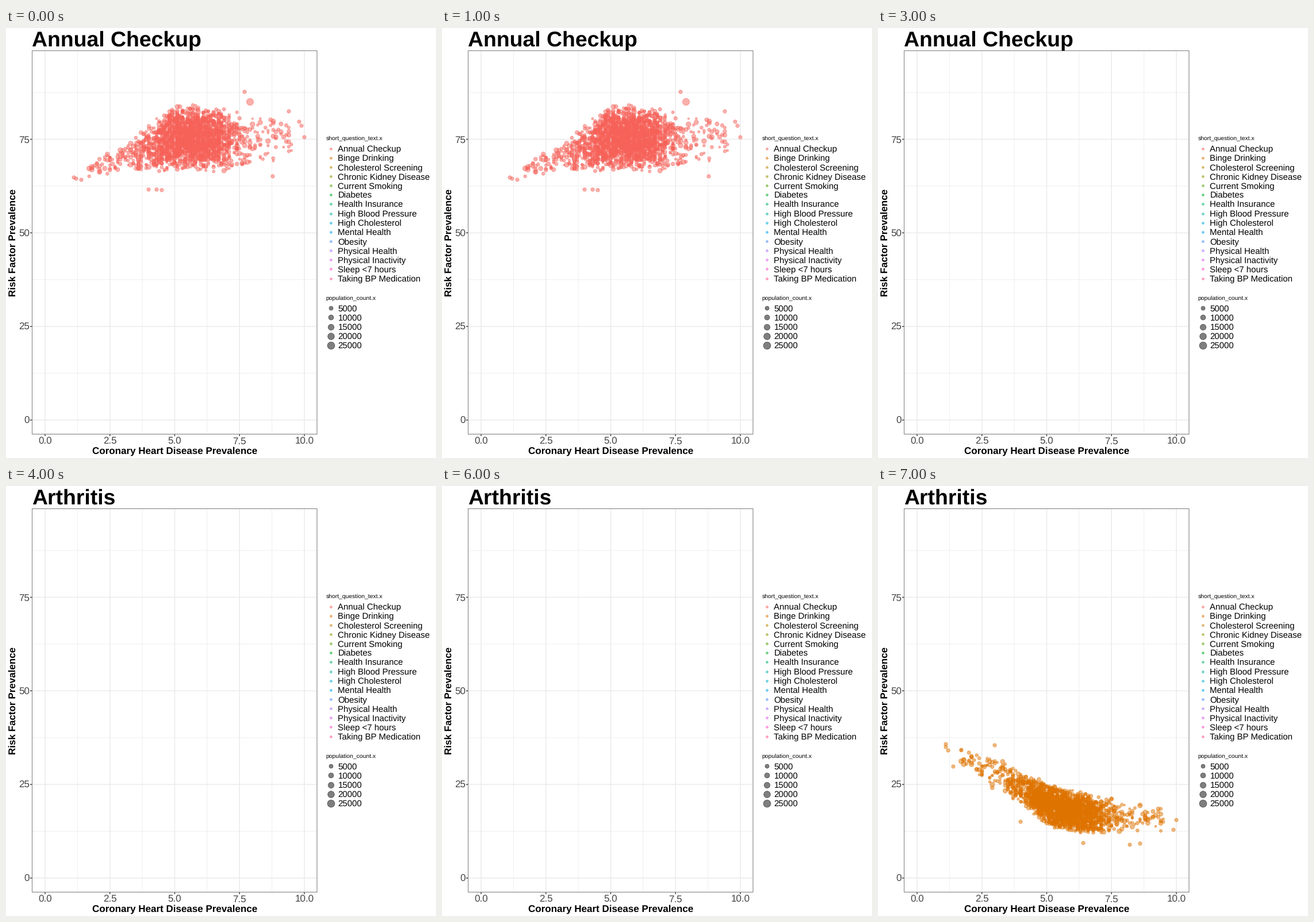
A matplotlib script that plays this animation: 748x748 px, repeating every 8000 ms.

```python
import numpy as np
import matplotlib.pyplot as plt
from matplotlib.animation import FuncAnimation
from matplotlib.colors import to_rgb

SIZE, DPI = 748, 64
PX = 72 / DPI  # points per pixel
LEFT, RIGHT, TOP, BOTTOM = 45.5, 541, 39.5, 706.5

plt.rcParams["font.family"] = "Liberation Sans"
plt.rcParams["text.hinting"] = "none"

fig = plt.figure(figsize=(SIZE / DPI, SIZE / DPI), dpi=DPI, facecolor="white")
ax = fig.add_axes([0, 0, 1, 1])
ax.set_xlim(0, SIZE)
ax.set_ylim(SIZE, 0)
ax.axis("off")


def px_x(v):
    return 68 + 45.1 * v


def px_y(v):
    return 682 - 6.513 * v


def line(xs, ys, color, width, z=1):
    ax.plot(xs, ys, color=color, lw=width * PX, zorder=z,
            solid_capstyle="butt", snap=False)


def label(x, y, text, size, color="black", **kw):
    return ax.text(x, y, text, fontsize=size * PX, color=color,
                   va="baseline", zorder=5, **kw)


def dots(x, y, diameter, color):
    edge = 0.9
    side = (np.asarray(diameter) - edge) * PX
    return ax.scatter(x, y, s=side ** 2, color=color, alpha=0.5,
                      lw=edge * PX, zorder=3)


def deepen(color):
    return tuple(np.array(to_rgb(color)) ** 1.25)


def draw_panel():
    for shift, width in ((0.5, 0.8), (0, 1.5)):
        for k in range(4 if shift else 5):
            x = px_x(2.5 * (k + shift))
            line([x, x], [TOP, BOTTOM], "#ebebeb", width)
        for k in range(4):
            y = px_y(25 * (k + shift))
            line([LEFT, RIGHT], [y, y], "#ebebeb", width)
    line([LEFT, RIGHT, RIGHT, LEFT, LEFT], [TOP, TOP, BOTTOM, BOTTOM, TOP],
         "#858585", 1.1, 4)
    for k in range(5):
        x = px_x(2.5 * k)
        line([x, x], [BOTTOM, BOTTOM + 3.5], "#333333", 1.4)
        label(x, 723.5, f"{2.5 * k:.1f}", 17, "#444444", ha="center")
    for k in range(4):
        y = px_y(25 * k)
        line([LEFT - 3.5, LEFT], [y, y], "#333333", 1.4)
        label(41, y + 6, str(25 * k), 17, "#444444", ha="right")
    label(293.3, 740.3, "Coronary Heart Disease Prevalence", 17,
          weight="bold", ha="center")
    label(17, 373.8, "Risk Factor Prevalence", 17, weight="bold",
          ha="center", rotation=90, rotation_mode="anchor")


def draw_legends():
    factors = {
        "Annual Checkup": "#F8766D", "Binge Drinking": "#E58700",
        "Cholesterol Screening": "#C99800",
        "Chronic Kidney Disease": "#A3A500", "Current Smoking": "#6BB100",
        "Diabetes": "#00BA38", "Health Insurance": "#00BF7D",
        "High Blood Pressure": "#00C0AF", "High Cholesterol": "#00BCD8",
        "Mental Health": "#00B0F6", "Obesity": "#619CFF",
        "Physical Health": "#B983FF", "Physical Inactivity": "#E76BF3",
        "Sleep <7 hours": "#FD61D1", "Taking BP Medication": "#FF67A4",
    }
    label(556.7, 195.2, "short_question_text.x", 10.35)
    for k, (name, color) in enumerate(factors.items()):
        y = 209.7 + 16.15 * k
        dots([564.7], [y - 0.2], [4.6], deepen(color))
        label(577.5, y + 5.4, name, 15)
    label(556.7, 473.2, "population_count.x", 10.35)
    for k in range(5):
        y = 487.3 + 16.1 * k
        dots([564.7], [y], [7.8 + 5.8 * (k / 4) ** 0.8], "black")
        label(577.5, y + 5.4, str(5000 * (k + 1)), 15)


rng = np.random.default_rng(12)
COUNT = 2050
core = rng.random(COUNT) < 0.7
prevalence = np.where(core, rng.normal(5.65, 0.85, COUNT),
                      rng.normal(5.4, 2.1, COUNT))
outside = (prevalence < 1.7) | (prevalence > 9.6)
prevalence[outside] = rng.normal(5.6, 1, outside.sum())
CITY_X = px_x(np.round(prevalence, 1))
CITY_SIZE = np.clip(6.4 * np.exp(rng.normal(0, 0.18, COUNT)), 3.6, 9.5)
KNOTS = [140, 200, 250, 300, 380, 495]


def cloud(color, top, mid, bottom, spread, loners):
    """Scatter the cities between two curves, plus a few loners."""
    u = rng.beta(spread, spread, COUNT)
    hi, centre, lo = (np.interp(CITY_X, KNOTS, c) for c in (top, mid, bottom))
    y = np.where(u < 0.5, hi + 2 * u * (centre - hi),
                 centre + (2 * u - 1) * (lo - centre))
    y = px_y(np.round((682 - y) / 6.513, 1))
    lx, ly = np.array(loners).T
    sizes = np.full(len(lx), 7.2)
    return dots(np.r_[CITY_X, lx], np.r_[y, ly], np.r_[CITY_SIZE, sizes],
                deepen(color))


draw_panel()
draw_legends()

checkup = cloud(
    "#F8766D",
    top=[238, 205, 165, 128, 140, 158],
    mid=[248, 225, 208, 190, 191, 190],
    bottom=[262, 254, 253, 249, 253, 240],
    spread=2.3,
    loners=[(415, 111), (118, 260), (122, 262), (131, 264), (248, 281),
            (262, 281), (271, 282), (492, 145), (510, 163), (514, 170),
            (519, 190), (464, 258)])
big_city = dots([424], [128], [13], deepen("#F8766D"))

drinking = cloud(
    "#E58700",
    top=[458, 468, 494, 519, 538, 552],
    mid=[472, 495, 525, 559, 575, 577],
    bottom=[484, 528, 556, 597, 607, 603],
    spread=2.1,
    loners=[(118, 449), (118, 454), (122, 460), (145, 459), (131, 488),
            (203, 451), (248, 584), (357, 621), (438, 624), (456, 622),
            (519, 581), (514, 598)])

title = label(44.8, 32.8, "", 37.4, weight="bold")


def update(i):
    title.set_text("Annual Checkup" if i < 4 else "Arthritis")
    checkup.set_visible(i < 3)
    big_city.set_visible(i < 3)
    drinking.set_visible(i >= 7)
    return title, checkup, big_city, drinking


anim = FuncAnimation(fig, update, frames=8, interval=1000, repeat=True,
                     repeat_delay=0, init_func=lambda: update(0))
plt.show()
```
